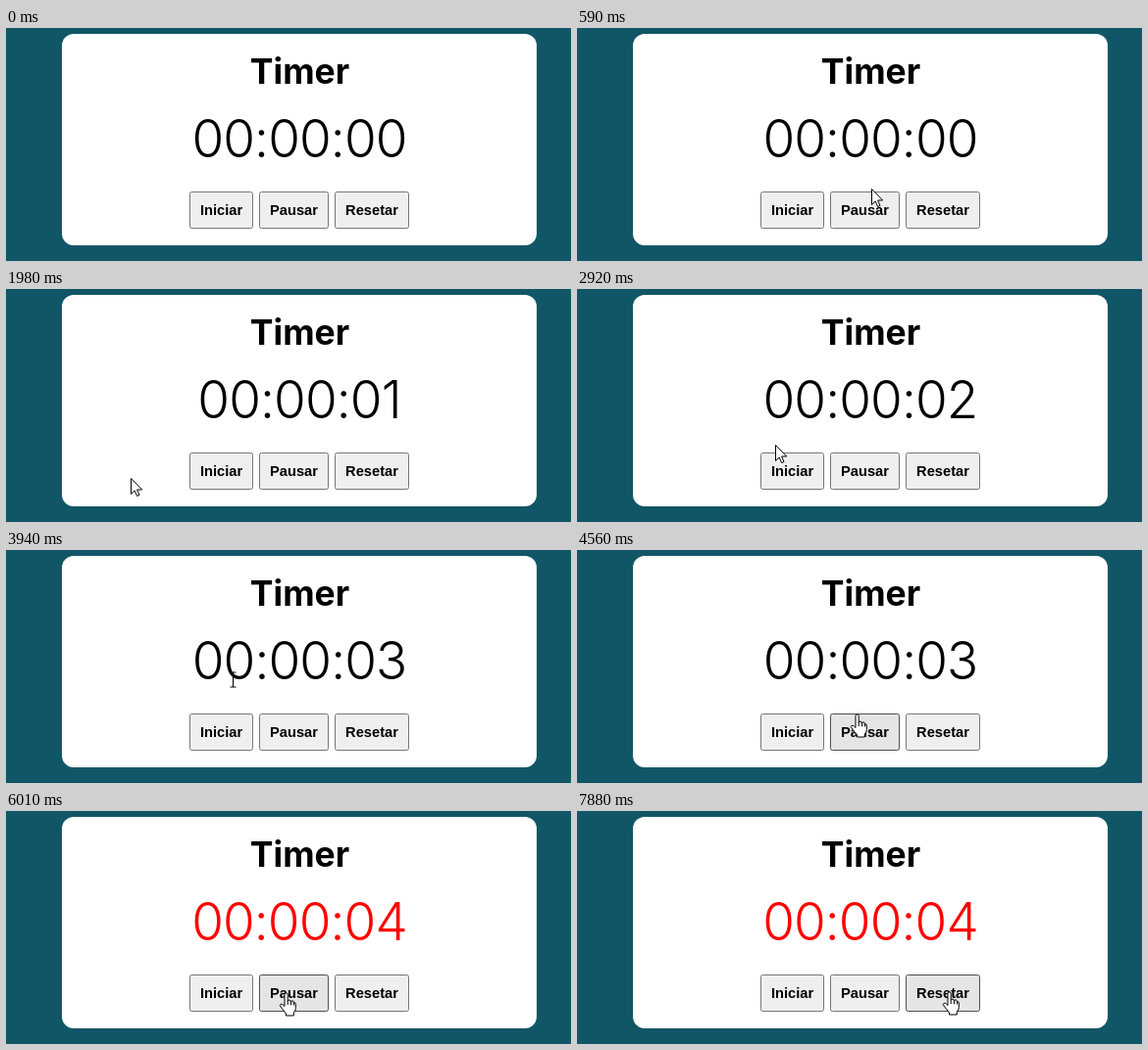
These frames come from a looping animation (576 px wide and 238 px high, 8 s). An HTML page:

```html
<!DOCTYPE html>
<html lang="pt">
<head>
<meta charset="utf-8">
<title>Timer</title>
<style>
  html, body { margin: 0; width: 100%; height: 100%; overflow: hidden; background: #115666; }
  svg { display: block; }
  text { text-anchor: middle; }
  .title { font: 700 35.5px Inter, sans-serif; }
  .time { font: 350 53px Inter, sans-serif; letter-spacing: -0.9px; font-feature-settings: "calt" 0; }
  .button text { font: bold 14.667px "Liberation Sans", Arial, sans-serif; }
  .button rect { fill: #efefef; stroke: #767676; }
  .button.hover rect { fill: #e5e5e5; stroke: #4f4f4f; }
  .button.active rect { fill: #f5f5f5; stroke: #8d8d8d; }
  #cursor path { fill: #fff; stroke: #000; stroke-linejoin: round; }
</style>
</head>
<body>
<svg width="576" height="238" viewBox="0 0 576 238">
  <rect width="576" height="238" fill="#115666"/>
  <rect x="57" y="6" width="484" height="216" rx="12" fill="#fff"/>
  <text class="title" x="299.5" y="57">Timer</text>
  <text class="time" id="time" x="299" y="132.3">00:00:00</text>
  <g id="buttons"></g>
  <g id="cursor">
    <path id="arrow" d="M.5.5V16.5L4.2 13 6.6 18.5 9 17.5 6.6 12H11.7Z"/>
    <path id="hand" d="M-1.5 14V2a1.6 1.6 0 0 1 3.2 0V9q.2-1.5 1.7-1.4t1.6 2q.3-1.4 1.6-1.2t1.5 2q1.5-.8 1.7 1.2V16q0 3-2 4.5V23.5H0V21.5L-5.5 14.5q-1.4-2 0-2.6t2.6.8zM1.7 9V12.5M5 9.6V12.8M8.1 10.4V13"/>
    <path id="beam" d="M-3-7.5H3M0-7.5V7.5M-3 7.5H3"/>
  </g>
</svg>
<script>
const LOOP = 8000;
const byId = id => document.getElementById(id);
const within = (v, low, high) => v >= low && v < high;

const buttons = [['Iniciar', 187, 65], ['Pausar', 258, 71], ['Resetar', 335, 76]].map(([label, x, width]) => {
  const node = document.createElementNS('http://www.w3.org/2000/svg', 'g');
  node.innerHTML = `<rect x="${x + .5}" y="167.5" width="${width - 1}" height="37" rx="2"/>
    <text x="${x + width / 2}" y="191">${label}</text>`;
  byId('buttons').append(node);
  return { node, label, x, width };
});

// Pointer moves: first step time, last step time, step count, destination
const start = [582, 81];
const moves = [
  [70, 740, 10, 222, 187],
  [890, 1140, 4, 113, 191],
  [1370, 1370, 1, 112, 191],
  [1520, 1600, 2, 127, 193],
  [2060, 2750, 10, 202, 159],
  [3070, 3220, 3, 221.5, 138],
  [3470, 3690, 4, 229.5, 131],
  [3940, 4560, 9, 285, 167],
  [4640, 5020, 6, 302, 185],
  [5860, 6010, 3, 285, 185],
  [7420, 7420, 1, 295, 185],
  [7570, 7880, 5, 379, 184],
];
const ticks = [1980, 2920, 3860, 4800];
const presses = { Iniciar: [890, 970], Pausar: [5630, 5710] };
const pausedAt = 5710;

function pointerAt(t) {
  let [x, y] = start;
  for (const [from, to, steps, endX, endY] of moves) {
    if (t < from) break;
    const done = t >= to ? steps : 1 + Math.floor((t - from) / (to - from) * (steps - 1) + 1e-6);
    const p = done / steps, eased = p * p * (3 - 2 * p);
    x += (endX - x) * eased;
    y += (endY - y) * eased;
  }
  return [Math.round(x), Math.round(y)];
}

function draw(t) {
  const [x, y] = pointerAt(t);
  let shape = within(x, 190, 409) && within(y, 74, 152) ? 'beam' : 'arrow';

  for (const { node, label, x: left, width } of buttons) {
    const hover = within(x, left, left + width) && within(y, 167, 205);
    const press = presses[label];
    const active = hover && press && within(t, ...press);
    if (hover) shape = 'hand';
    node.setAttribute('class', 'button' + (active ? ' active' : hover ? ' hover' : ''));
  }

  byId('time').textContent = '00:00:0' + ticks.filter(tick => t >= tick).length;
  byId('time').setAttribute('fill', t >= pausedAt ? '#f00' : '#000');

  for (const id of ['arrow', 'hand', 'beam']) byId(id).style.display = id === shape ? '' : 'none';
  const half = shape === 'arrow' ? 0 : .5;
  byId('cursor').setAttribute('transform', `translate(${x + half} ${y + half})`);
}

let begin;
function frame(now) {
  begin ??= now;
  draw((now - begin) % LOOP);
  requestAnimationFrame(frame);
}
draw(0);
requestAnimationFrame(frame);
</script>
</body>
</html>
```
